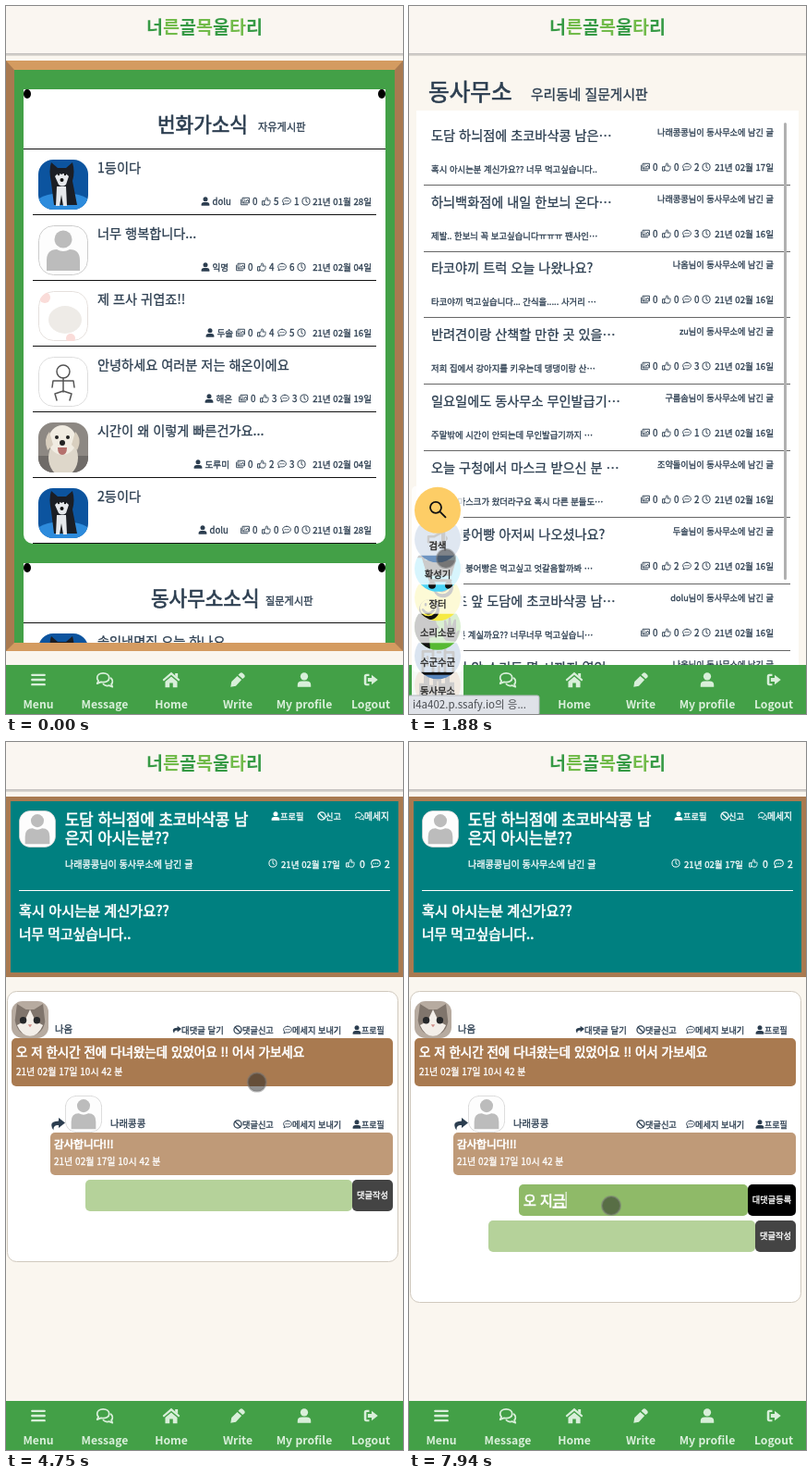
An HTML page that plays this animation: 430x765 px, repeating every 8 s.

```html
<!DOCTYPE html>
<html lang="ko">
<head>
<meta charset="utf-8">
<title>동네 게시판</title>
<style>
html, body { margin: 0; width: 100%; height: 100%; overflow: hidden; background: #faf6ef; }
svg#stage { display: block; width: 100vw; height: 100vh; }
text { font-family: "Noto Sans CJK KR", "Noto Sans CJK", sans-serif; white-space: pre; fill: currentColor; }
text.m, .m text { stroke: currentColor; stroke-width: .3px; }
text.h { stroke: currentColor; stroke-width: .7px; }
.b { font-weight: 700; }
.end { text-anchor: end; }
.mid { text-anchor: middle; }
</style>
</head>
<body>
<svg id="stage" viewBox="0 0 430 765" color="#2c3e50"></svg>
<script>
const LOOP = 8000, TICK = 110.3;
const GREEN = '#43a047', WOOD = '#a97a50', BLACK = '#111';

const T = (x, y, size, str, cls = '', color = '') =>
  `<text x="${x}" y="${y}" font-size="${size}" class="${cls}" ${color && `color="${color}"`}>${str}</text>`;
const R = (x, y, w, h, fill, r = 0, more = '') =>
  `<rect x="${x}" y="${y}" width="${w}" height="${h}" rx="${r}" fill="${fill}" ${more}/>`;
const C = (x, y, r, fill, more = '') => `<circle cx="${x}" cy="${y}" r="${r}" fill="${fill}" ${more}/>`;
const E = (x, y, rx, ry, fill) => `<ellipse cx="${x}" cy="${y}" rx="${rx}" ry="${ry}" fill="${fill}"/>`;
const P = (d, fill, more = '') => `<path d="${d}" fill="${fill}" ${more}/>`;
const L = (d, width = 1.5, color = 'currentColor') =>
  P(d, 'none', `stroke="${color}" stroke-width="${width}" stroke-linejoin="round" stroke-linecap="round"`);
const ring = (x, y, r, width, color = 'currentColor') =>
  C(x, y, r, 'none', `stroke="${color}" stroke-width="${width}"`);
const U = (name, x, y, size = 10, color = '') =>
  `<use href="#${name}" x="${x}" y="${y}" width="${size}" height="${size}" ${color && `color="${color}"`}/>`;

const ink = 'currentColor';
const icons = {
  user: C(8, 4.5, 4, ink) + P('M1 15.5v-2q0-4 4.5-4h5q4.5 0 4.5 4v2z', ink),
  image: L('M4 2h11v9H4zM1 5v9h11M5 10l3-3 1.5 1.5L12 5l2.5 4') + C(6.5, 4.7, 1, ink),
  thumb: L('M1.5 7.5h3v7h-3zM4.5 8l3-3.5V2c2-1 3 .5 3 1.5L9.5 6.5H14c1.5 1 .8 2 .3 2.3.7 1 .2 2-.3 2.3.3 1.2-.3 1.8-.8 2 0 1-.7 1.4-1.7 1.4H7.5L4.5 13'),
  dots: L('M8 2C3.8 2 1 4.5 1 7.5c0 1.6.7 2.8 1.8 3.8L1.5 14.2 5.5 12.6c6 1.2 9.5-1.8 9.5-5.1C15 4.5 12.2 2 8 2z') +
    [5, 8, 11].map(x => C(x, 7.5, 1, ink)).join(''),
  clock: ring(8, 8, 6.5, 1.6) + L('M8 4v4.5l2.5 1.5'),
  ban: ring(8, 8, 6.5, 2) + L('M3.5 3.5l9 9', 2),
  chat: L('M6.5 2C3 2 1 4 1 6.3c0 1.2.5 2 1.2 2.7L1 11.5 4.5 10c4.5 1 7.5-1 7.5-3.7S9.5 2 6.5 2z') +
    L('M13.5 6.5c2 1.5 2 4 .5 5.5l1 2.5-3-1.3c-2 .6-4 .2-5.3-1.2'),
  share: P('M9 1l7 5.5L9 12V9Q3 8.5 3.5 14.5-3 5 9 4.5z', ink),
  bars: L('M1.5 3h13M1.5 8h13M1.5 13h13', 2.3),
  home: P('M8 1l8 7-1.2 1.2L8 3.5 1.2 9.2 0 8zM8 5l5.5 4.7V15h-4v-4h-3v4h-4V9.7zM11.5 2H14v4l-2.5-2z', ink),
  pen: P('M10.5 1q1.5-1 2.500 0l2 2q1 1.500 0 2.500l-2 1.500-4.500-4zM7.500 4l4.500 4L6 14.500.5 15.500 1.500 10z', ink),
  out: P('M6.5 2H3.5Q1 2 1 4.5v7Q1 14 3.5 14h3v-2H3.5V4h3zM9 3l6.5 5L9 13v-3H5V6h4z', ink)
};

const avatars = {
  husky: R(0, 0, 54, 54, '#0c549f') + E(27, 48, 30, 12, '#2d8bdc') +
    P('M14 25q-3-14 0-22l7 6h9l7-6q3 10 0 20l5 26H17z', '#1b1e25') +
    P('M18 18q4-5 7-2 4-3 8 2l-3 9q-4 3-8 0zM20 29h10l1 21h-4l-2-12-2 12h-4z', '#e6e8ec') +
    C(22, 16, 1.2, BLACK) + C(29, 16, 1.2, BLACK) + C(25.5, 22, 2, BLACK),
  person: R(.5, .5, 53, 53, '#fdfdfd', 16, 'stroke="#ccc"') + C(27, 15, 9.5, '#bcbcbc') +
    P('M9 49V38q0-12 11-12 7 4 14 0 11 0 11 12v11z', '#bcbcbc'),
  pale: R(.5, .5, 53, 53, '#fff', 16, 'stroke="#e5e0dd"') +
    `<g id="spotsA">${C(7, 7, 6, '#fadcd9') + C(35, 51, 5, '#fadcd9')}</g>` +
    `<g id="spotsB">${C(41, 6, 5, '#f6cfd0')}</g>` + E(29, 31, 18, 15, '#eeebe7'),
  stick: R(.5, .5, 53, 53, '#fff', 16, 'stroke="#ddd"') + ring(27, 16, 7, 1.5, '#555') +
    L('M27 23v15M15 33l1-7h22l1 7M27 37l-9 3 2 7M27 37l9 3-2 7', 1.5, '#555'),
  pup: R(0, 0, 54, 54, '#8d8883') + R(0, 36, 54, 18, '#6f6b68') + E(27, 38, 16, 20, '#ded7ca') + E(26, 19, 15, 16, '#f1ece2') +
    P('M12 10q-7 8-2 20l6-6zM40 10q8 8 2 20l-6-6z', '#d9cfbf') +
    C(20, 16, 2, '#222') + C(32, 16, 2, '#222') + C(26, 22, 3, '#222') + P('M21 27h10q0 8-5 8t-5-8z', '#b5716d'),
  cat: R(0, 0, 54, 54, '#b7aba0') + P('M5 28L8 4l13 8h12L46 4l3 26q-4 20-22 20T5 28z', '#80756c') +
    P('M27 12l8 17 11 6q-7 16-19 16T8 35l11-6z', '#f3eee8') +
    C(17, 28, 5, '#26282a') + C(37, 28, 5, '#26282a') + P('M24 34h6l-3 4z', '#cf8f8a')
};

const defs = '<defs><clipPath id="round"><rect width="54" height="54" rx="16"/></clipPath>' +
  '<clipPath id="disc"><circle r="25"/></clipPath><clipPath id="board"><rect y="59" width="430" height="629"/></clipPath>' +
  Object.entries(icons).map(([id, art]) => `<symbol id="${id}" viewBox="0 0 16 16">${art}</symbol>`).join('') +
  Object.entries(avatars).map(([id, art]) => `<symbol id="${id}" viewBox="0 0 54 54"><g clip-path="url(#round)">${art}</g></symbol>`).join('') +
  '</defs>';

// Right-aligned post counters and date.
function meta(right, y, likes, comments, date, dx = 0) {
  const at = d => right + dx - d, top = y - 9;
  return '<g class="m">' + U('image', at(144), top) + T(at(131), y, 9.8, 0) + U('thumb', at(121), top) + T(at(108), y, 9.8, likes) +
    U('dots', at(99), top) + T(at(86), y, 9.8, comments) + U('clock', at(78), top) +
    T(right, y, 9.6, `21년 ${date}일`, 'end') + '</g>';
}

function card(top, title, titleX, sub, subX) {
  return R(19, top, 392, 491, '#fff', 10) + R(19, top, 392, 20, '#fff') +
    [23, 407].map(x => E(x, top + 5, 4, 5, '#000')).join('') +
    T(titleX, top + 46, 21.3, title, 'h') + T(subX, top + 45, 11.2, sub, 'm') + R(19, top + 64, 392, 1, BLACK);
}

function homePage() {
  const rows = [
    ['husky', '1등이다', 'dolu', 211, 5, 1, '01월 28', 2],
    ['person', '너무 행복합니다...', '익명', 211, 4, 6, '02월 04', -3],
    ['pale', '제 프사 귀엽죠!!', '두솔', 216, 4, 5, '02월 16', -3],
    ['stick', '안녕하세요 여러분 저는 해온이에요', '해온', 215, 3, 3, '02월 19', 0],
    ['pup', '시간이 왜 이렇게 빠른건가요...', '도루미', 203, 2, 3, '02월 04', -3],
    ['husky', '2등이다', 'dolu', 208, 0, 0, '01월 28', 2]
  ];
  return R(0, 59, 430, 638, WOOD) +
    P('M0 59H430L421 69H9zM0 697H430L421 688H9z', '#d49b60') + R(9, 69, 412, 619, GREEN) +
    '<g clip-path="url(#board)">' + card(90, '번화가소식', 164, '자유게시판', 273) +
    rows.map(([pic, title, who, x, likes, comments, date, dx], i) => {
      const y = 71 * i;
      return U(pic, 35, 166 + y, 54) + T(99, 180 + y, 14.2, title, 'm') + U('user', x, 206 + y) +
        T(x + 12.5, 215 + y, 9.6, who, 'm') + meta(396, 215 + y, likes, comments, date, dx) + R(29, 225 + y, 372, 1, BLACK);
    }).join('') +
    card(602, '동사무소소식', 157, '질문게시판', 281) + U('husky', 35, 678, 54) +
    T(99, 692, 14.2, '솔잎냉면집 오늘 하나요', 'm') + '</g>';
}

function listPage() {
  const rows = [
    ['도담 하늬점에 초코바삭콩 남은…', '혹시 아시는분 계신가요?? 너무 먹고싶습니다..', '나래콩콩', 0, 2],
    ['하늬백화점에 내일 한보늬 온다…', '제발.. 한보늬 꼭 보고싶습니다ㅠㅠㅠ 팬사인…', '나래콩콩', 0, 3],
    ['타코야끼 트럭 오늘 나왔나요?', '타코야끼 먹고싶습니다... 간식을..... 사거리 …', '나옴', 0, 0],
    ['반려견이랑 산책할 만한 곳 있을…', '저희 집에서 강아지를 키우는데 댕댕이랑 산…', 'zu', 0, 3],
    ['일요일에도 동사무소 무인발급기…', '주말밖에 시간이 안되는데 무인발급기까지 …', '구름솜', 0, 1],
    ['오늘 구청에서 마스크 받으신 분 …', '집으로 마스크가 왔더라구요 혹시 다른 분들도…', '조약돌이', 0, 2],
    ['오늘 붕어빵 아저씨 나오셨나요?', '눈오는데 붕어빵은 먹고싶고 엇갈음할까봐 …', '두솔', 2, 2],
    ['꽃담초 앞 도담에 초코바삭콩 남…', '아시는 분 계실까요?? 너무너무 먹고싶습니…', 'dolu', 0, 2],
    ['사거리 앞 소리도 몇 시까지 열었…', '', '나옴', 0, 0]
  ];
  return T(21, 102, 24.6, '동사무소', 'h') + T(132, 101, 14.8, '우리동네 질문게시판', 'm') + R(8, 113, 414, 652, '#fff') +
    rows.map(([title, body, who, likes, comments], i) => {
      const y = Math.floor(71.86 * i + .15);
      return T(24, 145 + y, 14.2, title, 'm') + T(24, 180 + y, 9.4, body, 'm') +
        T(395, 140 + y, 9.2, `${who}님이 동사무소에 남긴 글`, 'end m') +
        meta(395, 178 + y, likes, comments, i ? '02월 16' : '02월 17') + R(16, 193 + y, 397, 1, '#666');
    }).join('') + R(406, 126, 3, 494, '#b0b0b0', 1.5, 'id="scrollbar"');
}

function links(y, withReply) {
  return '<g class="m">' + (withReply ? U('share', 180, y - 9) + T(190, y, 9.4, '대댓글 달기') : '') +
    U('ban', 246, y - 9) + T(256, y, 9.2, '댓글신고') + U('dots', 300, y - 9) + T(310, y, 9.2, '메세지 보내기') +
    U('user', 375, y - 9) + T(385, y, 9, '프로필') + '</g>';
}

function postPage() {
  const stamp = '21년 02월 17일 10시 42 분';
  return R(0, 59, 430, 195, WOOD) + R(5, 64, 420, 185, '#008080') + U('person', 14, 74, 40) +
    '<g color="#fff" class="m">' +
    T(64, 90, 16.7, '도담 하늬점에 초코바삭콩 남', 'h') + T(64, 110, 16.7, '은지 아시는분??', 'h') +
    T(64, 136, 10.1, '나래콩콩님이 동사무소에 남긴 글') +
    U('user', 287, 75) + T(297, 84, 9.2, '프로필') + U('ban', 337, 75) + T(346, 84, 9.2, '신고') +
    U('chat', 378, 75) + T(388, 84, 9.8, '메세지') +
    U('clock', 284, 126) + T(298, 136, 9.6, '21년 02월 17일') + U('thumb', 368, 126) + T(383, 136, 10.5, 0) +
    U('dots', 395, 126, 11) + T(410, 136, 10.5, 2) + R(14, 160, 402, 1, '#fff') +
    T(14, 188, 15.2, '혹시 아시는분 계신가요??', 'h') + T(14, 213, 14.8, '너무 먹고싶습니다..', 'h') + '</g>' +
    R(1.5, 269.5, 423, 292, '#fff', 10, 'stroke="#d0c9be" id="panel"') +
    U('cat', 6, 280, 40) + T(53, 314, 10.4, '나옴', 'm') + links(315, true) + R(6, 320, 413, 52, WOOD, 5) +
    T(11, 340, 13.5, '오 저 한시간 전에 다녀왔는데 있었어요 !! 어서 가보세요', 'h', '#fff') + T(11, 360, 10, stamp, 'm', '#fff') +
    U('share', 48, 405, 16) + U('person', 64, 382, 40) + T(113, 416, 10.4, '나래콩콩', 'm') + links(417) +
    R(48, 422, 371, 46, '#bf9a78', 5) + T(52, 439, 11.6, '감사합니다!!!', 'h', '#fff') + T(52, 457, 10, stamp, 'm', '#fff') +
    '<g id="reply">' + R(119, 478, 248, 34, '#8fba68', 5) + R(367, 478, 52, 34, '#000', 5) +
    T(393, 498, 9.2, '대댓글등록', 'mid m', '#fff') + T(124, 501, 15, '', 'h typed', '#fff') +
    R(124, 486, 1, 18, '#fff', 0, 'id="caret"') + '</g>' +
    '<g id="comment">' + R(86, 473, 289, 34, '#b5d29a', 5) + R(375, 473, 44, 34, '#444', 5) +
    T(397, 493, 9.3, '댓글작성', 'mid m', '#fff') + '</g>';
}

function header() {
  const name = [...'너른골목울타리'].map((ch, i) => `<tspan fill="${i % 2 ? '#72bb4b' : '#369a45'}">${ch}</tspan>`).join('');
  return R(0, 0, 430, 52, '#faf6f1') + R(0, 51.5, 430, 1, '#8f8f8f') + R(0, 52.5, 430, 1.5, '#dcd8d2') +
    T(215, 29.5, 19.6, name, 'mid b');
}

function nav() {
  const items = [['bars', 'Menu'], ['chat', 'Message'], ['home', 'Home'], ['pen', 'Write'], ['user', 'My profile'], ['out', 'Logout']];
  return R(0, 712, 430, 53, GREEN) + items.map(([icon, label], i) => {
    const x = 35 + 72 * i, size = icon === 'chat' || icon === 'home' ? 19 : 16.5;
    return U(icon, x - size / 2, 728 - size / 2, size, '#d9efda') + T(x, 759, 12.2, label, 'mid b', '#d9efda');
  }).join('');
}

function menu() {
  const face = (x, y) => C(x, y, 11, BLACK) + C(x - 1, y - 2, 9, '#f6ea45') +
    L(`M${x - 7} ${y}q6 8 12 0M${x - 4} ${y - 6}v1M${x + 3} ${y - 6}v1`, 2.5, BLACK);
  const items = [
    ['검색', '#fdcd66', ring(-2, -3, 6, 1.8, BLACK) + L('M2.5 1.5l6 6', 1.8, BLACK)],
    ['확성기', '#6d94c1', L('M-10-3h6L7-9V7L-4 3h-6zM-7 4l2 6h4l-2-6', 2.5, BLACK) + P('M4-9h4V8H4zM9-4q4 3 0 6z', BLACK)],
    ['장터', '#4ad3f6', L('M-22-13h6l8 26h22', 3, BLACK) + P('M-16-9h36l-5 17h-26z', BLACK) + C(-6, 18, 4, BLACK) + C(12, 18, 4, BLACK)],
    ['소리소문', '#f6ea45', face(6, -11) + face(-9, 13)],
    ['수군수군', '#57b932', P('M-25-16q14-6 21 1l3 12 3 4-3 2v7l-8 2 1 13h-17z', BLACK) + P('M9 15q-6-6-5-14l3 3V-7h2l2 7 1-10h2l1 10 3-8h2v15l2-3h2l-4 12z', BLACK)],
    ['동사무소', '#5583ba', L('M-16 18V-5h11M-5 18v-36H8v36M8-4h9v22M-20 19h40', 2.8, BLACK) +
      L('M-11 1v2M-11 8v2M0-11h3M0-4h3M0 3h3M1.500 12v6M12 2v2M12 9v2', 2.5, BLACK)],
    ['번화가', '#c3a078', P('M-20 20v-22h5v-8h3v-6l3 4v12h4v-14l5-7 4 7v12h4v-9l5-4v12h5v23z', '#1c1815') +
      L('M-14 4v10M-7 6v8M0-4v16M8 4v9M14 2v11', 1.2, '#c3a078')]
  ];
  // The first item lies on top of the stack.
  return '<g id="menu">' + items.map(([label, color, art]) =>
    `<g>${R(-28, -26, 56, 75, '#fff', 5, 'opacity=".78"') + C(0, 0, 25, color)}<g clip-path="url(#disc)">${art}</g>` +
    T(0, 42, 10.4, label, 'mid m', '#222') + '</g>').reverse().join('') + '</g>';
}

const tooltip = '<g id="tooltip">' + R(-1, 745, 142, 21, '#dfe2e8', 2, 'stroke="#b4b8be"') +
  T(4, 759, 11.5, 'i4a402.p.ssafy.io의 응...', '', '#4a4d52') + '</g>';

const stage = document.getElementById('stage');
stage.innerHTML = defs + R(0, 0, 430, 765, '#faf6ef') +
  [homePage, listPage, postPage].map(page => `<g class="page">${page()}</g>`).join('') +
  header() + nav() + menu() + tooltip +
  '<circle id="cursor" r="10" fill="#222" fill-opacity=".5" stroke="#777" stroke-opacity=".5" stroke-width="2"/>';

const $ = id => document.getElementById(id);
const pages = [...document.querySelectorAll('.page')];
const menuItems = [...$('menu').children].reverse();
const typed = document.querySelector('.typed');

// Tables of [tick, value, ...].
const cursorPath = [
  [1, 198, 320], [6, 35, 738], [8, 35, 738], [12, 41, 607], [15, 40, 597], [18, 40, 597], [24, 141, 258], [25, 141, 258],
  [27, 133, 291], [29, 133, 291], [32, 147, 174], [35, 147, 174], [36, 150, 269], [39, 175, 458], [44, 296, 345],
  [45, 300, 338], [48, 327, 300], [51, 247, 311], [52, 237, 311], [54, 237, 311], [58, 190, 522], [62, 219, 501]
];
const menuSpread = [[7, 0], [8, .3], [9, .7], [10, .92], [11, 1], [15, 1], [16, .78], [17, .42], [18, .15], [19, 0]];
const typing = ['ㅇ', '오', '오 ', '오 지', '오 직', '오 지그', '오 지금'];

function track(points, tick) {
  const next = points.findIndex(p => p[0] > tick);
  if (next < 0) return points[points.length - 1].slice(1);
  if (next === 0) return points[0].slice(1);
  const a = points[next - 1], b = points[next], k = (tick - a[0]) / (b[0] - a[0]);
  return a.slice(1).map((v, i) => v + (b[i + 1] - v) * k);
}
const show = (el, on) => { el.style.display = on ? '' : 'none'; };

function draw(tick) {
  const page = tick < 17 ? 0 : tick < 33 ? 1 : 2;
  pages.forEach((el, i) => show(el, i === page));
  show($('spotsA'), tick % 8 < 4);
  show($('spotsB'), tick % 8 >= 4);
  show($('scrollbar'), tick < 23);
  show($('tooltip'), tick >= 15 && tick < 20);

  const [spread] = track(menuSpread, tick);
  show($('menu'), spread > 0);
  menuItems.forEach((el, i) => el.setAttribute('transform', `translate(31 ${788 + (75 * i - 579) * spread})`));

  const open = tick >= 54;
  show($('reply'), open);
  $('panel').setAttribute('height', open ? 336 : 292);
  $('comment').setAttribute('transform', `translate(0 ${open ? 44 : 0})`);

  const str = tick < 66 ? '' : typing[Math.min(tick - 66, typing.length - 1)];
  typed.innerHTML = str && str.slice(0, -1) +
    (str.endsWith(' ') ? ' ' : `<tspan text-decoration="underline">${str.slice(-1)}</tspan>`);
  show($('caret'), tick >= 59 && (tick < 64 || tick >= 66));
  $('caret').setAttribute('x', 124 + (str && open ? typed.getComputedTextLength() : 0));

  const [x, y] = track(cursorPath, tick);
  show($('cursor'), tick >= 1);
  $('cursor').setAttribute('cx', x);
  $('cursor').setAttribute('cy', y);
}

const start = performance.now();
function loop() {
  const time = (performance.now() - start) % LOOP;
  draw(Math.floor((time + 5) / TICK));
  requestAnimationFrame(loop);
}
loop();
</script>
</body>
</html>
```
